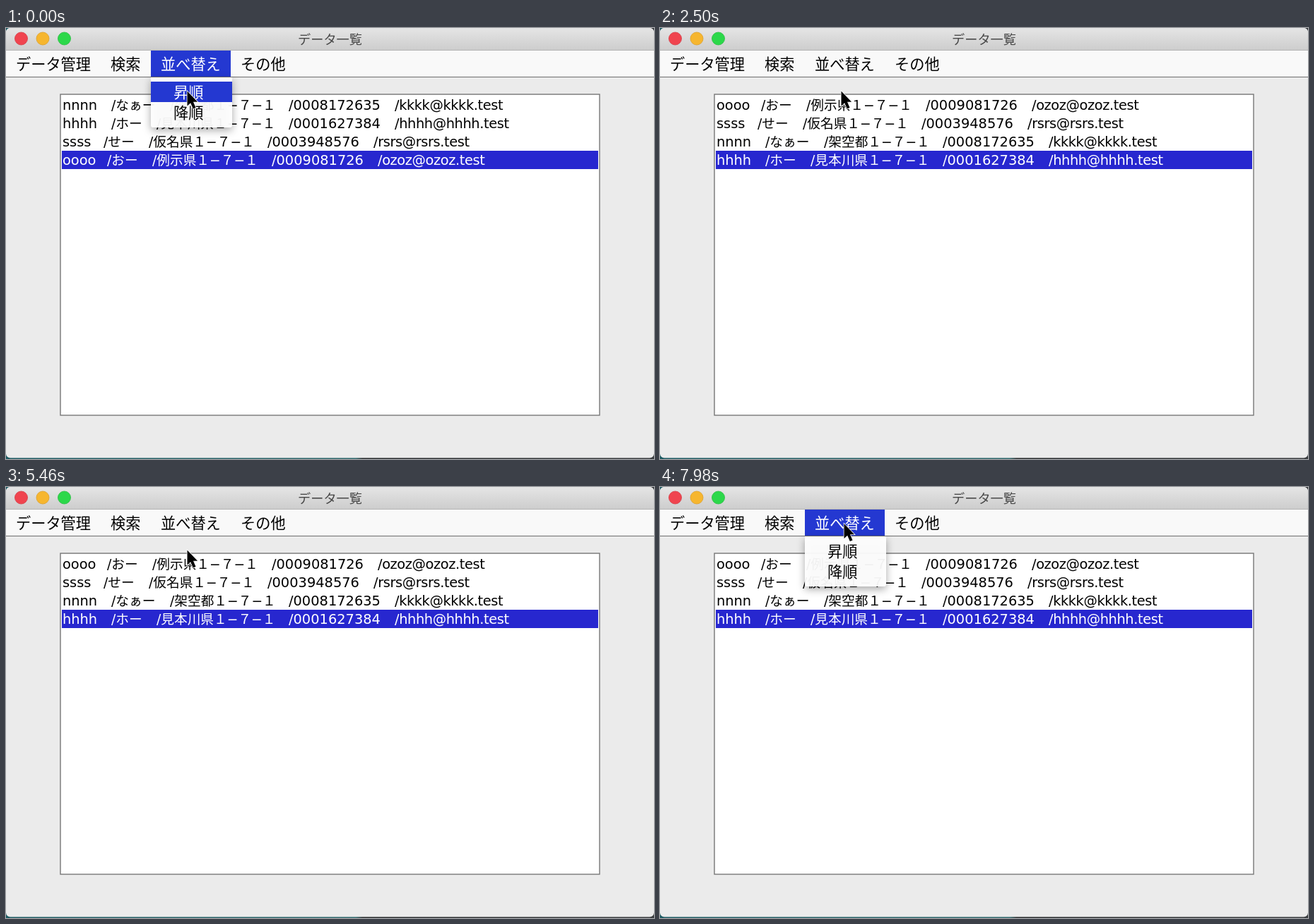
An HTML page that plays this animation: 917x611 px, repeating every 8000 ms.

```html
<!DOCTYPE html>
<html lang="ja">
<head>
<meta charset="utf-8">
<style>
  html, body { margin: 0; width: 100%; height: 100%; overflow: hidden; background: #ebebeb; }
  svg { display: block; width: 917px; height: 611px; font-family: "DejaVu Sans", "Noto Sans CJK JP", "Noto Sans CJK", sans-serif; }
  .ui { font: 21.2px "Noto Sans CJK JP", "Noto Sans CJK", sans-serif; }
  .title { font-size: 18.2px; fill: #484848; }
  .latin { font-size: 19.4px; }
  .kana { font-size: 18.7px; }
  .mail { letter-spacing: -.4px; }
  .panel { filter: drop-shadow(0 4px 6px rgba(0, 0, 0, .36)); }
</style>
</head>
<body>
<svg viewBox="0 0 917 611">
  <defs>
    <linearGradient id="bar" x2="0" y2="1">
      <stop stop-color="#e5e5e5"/><stop offset="1" stop-color="#cdcdcd"/>
    </linearGradient>
    <linearGradient id="desk">
      <stop stop-color="#1d5a62"/><stop offset=".54" stop-color="#2f686c"/>
      <stop offset=".55" stop-color="#26292b"/><stop offset="1" stop-color="#3a3d40"/>
    </linearGradient>
    <clipPath id="window"><rect width="917" height="609.5" rx="6"/></clipPath>
  </defs>
  <rect width="917" height="611" fill="url(#desk)"/>
  <g clip-path="url(#window)">
    <rect width="917" height="611" fill="#ebebeb"/>
    <rect width="917" height="31" fill="url(#bar)"/>
    <rect y="31" width="917" height="1" fill="#b4b4b4"/>
    <rect y="32" width="917" height="37" fill="#f9f9f9"/>
    <rect y="69" width="917" height="1" fill="#6e6e6e"/>
  </g>
  <circle cx="21.5" cy="15" r="9" fill="#f0444f" stroke="#d63a44" stroke-width=".8"/>
  <circle cx="52" cy="15" r="9" fill="#f6b62f" stroke="#dc9f29" stroke-width=".8"/>
  <circle cx="82.5" cy="15" r="9" fill="#2cd84a" stroke="#27bd3f" stroke-width=".8"/>
  <text class="ui title" x="413" y="22.5">データ一覧</text>
  <rect x="77.5" y="94.5" width="763" height="455" fill="none" stroke="#f8f8f8"/>
  <rect x="77" y="94" width="763" height="455" fill="#fff" stroke="#767676" stroke-width="1.4"/>
  <rect x="79" y="174" width="759" height="26" fill="#2727cf"/>
  <g id="list"></g>
  <rect id="tab" x="205" y="32" width="113" height="37" fill="#2438d1"/>
  <g class="ui">
    <text x="14" y="59">データ管理</text>
    <text x="148" y="59">検索</text>
    <text id="sort" x="219" y="59">並べ替え</text>
    <text x="332" y="59">その他</text>
  </g>
  <g id="popup" class="ui">
    <path class="panel" d="M205 70H320V138Q320 141 317 141H208Q205 141 205 138Z" fill="#fff" fill-opacity=".94"/>
    <rect id="choice" x="205" y="76" width="115" height="29" fill="#2438d1"/>
    <text id="ascending" x="237" y="99">昇順</text>
    <text x="237" y="128">降順</text>
  </g>
  <path id="cursor" d="M0 0V21L4.7 16.7 8.3 25 12 23.4 8.5 15.2H14.6Z" stroke="#fff" stroke-width="1.5" paint-order="stroke"/>
</svg>
<script>
const $ = id => document.getElementById(id);
const LOOP = 8000;

// Each record: its fields and the x position of every field.
const records = [
  { fields: ["nnnn", "/なぁー", "/架空都１−７−１", "/0008172635", "/kkkk@kkkk.test"], xs: [80, 149, 232, 400, 550] },
  { fields: ["hhhh", "/ホー", "/見本川県１−７−１", "/0001627384", "/hhhh@hhhh.test"], xs: [80, 149, 213, 400, 550] },
  { fields: ["ssss", "/せー", "/仮名県１−７−１", "/0003948576", "/rsrs@rsrs.test"], xs: [80, 138, 202, 370, 520] },
  { fields: ["oooo", "/おー", "/例示県１−７−１", "/0009081726", "/ozoz@ozoz.test"], xs: [80, 143, 207, 376, 526] },
];
const classes = ["latin", "kana", "kana", "latin", "latin mail"];
const unsorted = [0, 1, 2, 3], sorted = [3, 2, 0, 1];

const rows = records.map(({ fields, xs }) => {
  const row = document.createElementNS("http://www.w3.org/2000/svg", "g");
  row.innerHTML = fields.map((text, i) => `<text class="${classes[i]}" x="${xs[i]}" y="116">${text}</text>`).join("");
  return $("list").appendChild(row);
});

const progress = (t, start, end) => Math.min(1, Math.max(0, (t - start) / (end - start)));
const show = (id, opacity) => $(id).setAttribute("opacity", opacity);
const paint = (id, lit) => $(id).setAttribute("fill", lit ? "#fff" : "#000");

function draw(t) {
  // The chosen item blinks once, then the menu fades and the list is sorted.
  const reopened = t >= 7540;
  const open = t < 2460 || reopened;
  const chosen = t < 2220 || (t >= 2280 && t < 2460);
  show("popup", reopened ? 1 : 1 - progress(t, 2320, 2460));
  show("choice", chosen ? 1 : 0);
  show("tab", open ? 1 : 0);
  paint("ascending", chosen);
  paint("sort", open);

  (t < 2440 ? unsorted : sorted).forEach((record, line) => {
    rows[record].setAttribute("transform", `translate(0 ${line * 26})`);
    rows[record].setAttribute("fill", line === 3 ? "#fff" : "#000");
  });

  const p = progress(t, 5460, 5900), eased = p * p * (3 - 2 * p);
  $("cursor").setAttribute("transform", `translate(${256.5 + 4 * eased} ${89.5 - 37.5 * eased})`);
}

function frame() {
  draw(performance.now() % LOOP);
  requestAnimationFrame(frame);
}
frame();
</script>
</body>
</html>
```
